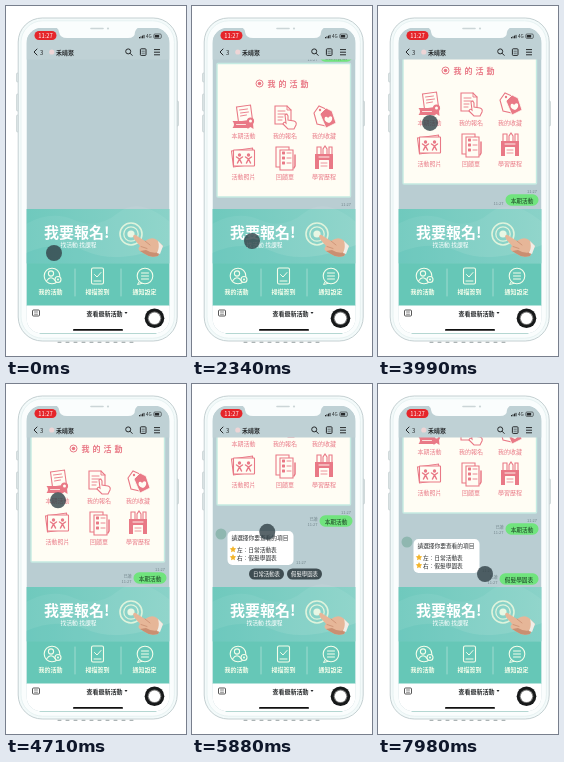
Write an HTML page that moves like this. It is 180 px wide and 350 px high and loops after 8 s.

```html
<!DOCTYPE html>
<html lang="zh-Hant">
<head>
<meta charset="utf-8">
<style>
  html, body { margin: 0; width: 100%; height: 100%; overflow: hidden; background: #fff; }
  svg { display: block; width: 100vw; height: 100vh; }
  text { font-family: "Noto Sans CJK TC", "Noto Sans CJK", "Noto Sans", sans-serif; }
</style>
</head>
<body>
<svg id="stage" viewBox="0 0 180 350"></svg>
<script>
const PINK = '#e97986', CREAM = '#fffdf4', BLACK = '#26292b', GREEN = '#70e47d', PALE = '#f4fdea', MUTED = '#73868c';
const stage = document.getElementById('stage');

const rect = (x, y, w, h, r, fill, more = '') =>
  `<rect x="${x}" y="${y}" width="${w}" height="${h}" rx="${r}" fill="${fill}" ${more}/>`;
const circle = (x, y, r, fill, more = '') =>
  `<circle cx="${x}" cy="${y}" r="${r}" fill="${fill}" ${more}/>`;
const path = (d, fill = 'none', more = '') => `<path d="${d}" fill="${fill}" ${more}/>`;
const stroke = (color, width = 1) => `stroke="${color}" stroke-width="${width}"`;
const line = (d, color, width = 1) =>
  path(d, 'none', `${stroke(color, width)} stroke-linecap="round" stroke-linejoin="round"`);
const text = (str, x, y, size, fill = BLACK, more = '') =>
  `<text x="${x}" y="${y}" font-size="${size}" fill="${fill}" dominant-baseline="central" ${more}>${str}</text>`;
const label = (str, x, y, size, fill, more = '') =>
  text(str, x, y, size, fill, `text-anchor="middle" ${more}`);
const group = (id, content) => `<g id="${id}">${content}</g>`;
const at = (x, y, content) => `<g transform="translate(${x} ${y})">${content}</g>`;
const BOLD = 'font-weight="700"', MEDIUM = 'font-weight="500"', END = 'text-anchor="end"';

// A sent message: green bubble, send time and a "read" mark.
function sent(id, str, y, width) {
  const x = 160.5 - width;
  return group(id,
    rect(x, y - 5.7, width, 11.4, 5.7, GREEN) +
    label(str, x + width / 2, y, 5.7, '#183d20', MEDIUM) +
    text('11:27', x - 2, y + 2.5, 4, MUTED, END) +
    group(id + 'Read', text('已讀', x - 2, y - 2.5, 4, MUTED, END)));
}

// Card icons, each drawn around its own centre.
const OUTLINE = stroke(PINK, 1.1);
const person = (x, y) => circle(x, y - 4, 1.7, PINK) + line(`M${x - 3} ${y - 2}L${x} ${y}L${x + 3} ${y - 2}M${x - 2} ${y + 4}L${x} ${y}L${x + 2} ${y + 4}`, PINK, 1.5);
const icons = {
  scroll: path('M-7 -10L7 -12L9 3L-5 5Z', CREAM, OUTLINE) + line('M-4 -7L4 -8M-3 -4L5 -5M-3 -1L3 -2', PINK, .9) +
    path('M-11 4H5V11H-11Q-8 7.5 -11 4Z', PINK) + line('M-7 7.5H2', CREAM, .8) +
    circle(7, 4, 3.6, PINK) + circle(7, 4, 1.5, CREAM) + path('M4.5 6L4 12L7 10L10 12L9.5 6Z', PINK),
  touch: path('M-10 -11H2L6 -7V7H-10Z', CREAM, OUTLINE) + line('M2 -11V-7H6M-7 -6H0M-7 -3H2M-7 0H-2M-7 3H-3', PINK, .9) +
    path('M0 -2Q2 -4 3 -1V3L9 4Q12 5 11 8L9 12H3L-2 7Q-1 4 1 6Z', CREAM, OUTLINE),
  save: path('M-10 -4L-5 -11L2 -8V9L-7 7Z', CREAM, OUTLINE) + circle(-4, -7, 1.2, PINK) +
    path('M-4 -3L2 -9L8 -6L12 6L2 11Z', PINK, stroke(CREAM, .8)) +
    path('M5 6Q-1 4 1 0Q3 -1 4 1Q6 -2 8 0Q9 4 5 6Z', CREAM),
  photos: path('M-12 -7L9 -10L11 6L-10 9Z', CREAM, OUTLINE) + rect(-10, -8, 21, 16, .5, CREAM, OUTLINE) +
    person(-4, 1) + person(5, 1),
  form: path('M-9 -11H4V9H-9Z', CREAM, OUTLINE) + path('M-5 -8H8V12H-5Z', CREAM, OUTLINE) +
    [-5, 0, 5].map(y => rect(-3, y - 1.5, 3, 3, .4, PINK) + line(`M2 ${y}H6`, PINK, .9)).join('') +
    line('M10 -3V8L9 10', PINK, 1.5),
  history: path('M-9 -4H9V11H-9Z', PINK) + rect(-5, 2, 10, 9, .5, CREAM) + line('M-3 5H3M-3 8H3', PINK, .8) +
    path('M-7 -4V-11H-3V-4M-1 -4V-9L1 -12L3 -9V-4M5 -4V-11H8V-4', CREAM, OUTLINE) + line('M-5 -1H5', CREAM, .9)
};
const cardItems = [
  ['scroll', '本期活動', 51.5, 111], ['touch', '我的報名', 93, 111], ['save', '我的收藏', 132, 111],
  ['photos', '活動照片', 51.5, 152], ['form', '回饋單', 93, 152], ['history', '學習歷程', 132, 152]
];

const card = group('card',
  rect(25, 57.5, 133.5, 133.5, 1, CREAM, stroke('#c5ebe2', 1.4)) +
  circle(67.5, 77.5, 3.5, 'none', stroke(PINK)) + circle(67.5, 77.5, 1.8, PINK) +
  [...'我的活動'].map((ch, i) => label(ch, 79.5 + i * 11, 77.5, 8, PINK, BOLD)).join('') +
  cardItems.map(([icon, name, x, y]) => at(x, y, icons[icon]) + label(name, x, y + 18.5, 6, PINK)).join('') +
  text('11:27', 159, 198, 4, MUTED, END));

const star = y => path(`M41 ${y - 3}l1 2.1 2.3.3-1.7 1.6.4 2.3-2-1.1-2 1.1.4-2.3-1.7-1.6 2.3-.3z`, '#f3b52c');
const reply = group('reply',
  circle(29, 220, 5.5, '#8fb7b0') +
  rect(35.5, 217, 66, 34, 5, '#fff') +
  text('請選擇你要查看的項目', 39.5, 223, 5.7) +
  star(235) + text('左：日常活動表', 45, 235, 5.7) +
  star(243) + text('右：假髮學園表', 45, 243, 5.7) +
  text('11:27', 104, 248, 4, MUTED));

const pill = (str, x, width) =>
  rect(x, 184.5, width, 11, 5.5, '#3f4d52') + label(str, x + width / 2, 190, 5.4, '#fff');

const chat = `<g clip-path="url(#chatArea)">` + group('feed',
    group('today', rect(84.5, 33, 14, 8, 4, '#9fb1b6') + label('今天', 91.5, 37, 4.4, '#eef4f5')) +
    sent('first', '我的活動', 50, 33) + card + sent('second', '本期活動', 207, 33) + reply +
    sent('third', '假髮學園表', 257, 39)) +
  group('choices', pill('日常活動表', 57, 35) + pill('假髮學園表', 95, 35)) + '</g>';

const header =
  rect(20.5, 22, 143, 31.5, 0, '#bfd1d5') +
  line('M31 43L28 46L31 49', BLACK) + text('3', 34, 46, 6, BLACK, MEDIUM) +
  circle(45.8, 46, 2.6, '#eed5d6') + text('禾晴聚', 50, 46, 6, BLACK, BOLD) +
  circle(122.2, 45.4, 2.5, 'none', stroke(BLACK)) + line('M124.2 47.4L126.2 49.4', BLACK) +
  rect(134.4, 42.8, 5.6, 6.6, .8, 'none', stroke(BLACK)) + line('M136 45.2H138.4M136 47.2H138.4', BLACK, .6) +
  line('M148.4 43.6H153.6M148.4 46.2H153.6M148.4 48.8H153.6', BLACK) +
  rect(28.5, 25, 22, 9, 4.5, '#e5262b') +
  group('clock', label('11:27', 39.5, 29.5, 5.8, '#fff', MEDIUM)) +
  group('recording', circle(39.5, 29.5, 2.7, 'none', stroke('#fff', .8)) + circle(39.5, 29.5, 1.3, '#fff')) +
  [0, 1, 2, 3].map(i => rect(133 + i * 1.5, 31 - i * .7, 1, 1.3 + i * .7, 0, BLACK)).join('') +
  text('4G', 140, 30.3, 4.6, BLACK, MEDIUM) +
  rect(147.8, 28, 7.5, 4.4, 1.2, 'none', stroke(BLACK, .6)) + rect(148.8, 29, 4.4, 2.4, .5, BLACK);

const ICON_LINE = stroke(PALE, 1.1), LOWER = '#66c7b7';
const menu =
  rect(20.5, 203, 143, 97, 0, LOWER) +
  rect(20.5, 203, 143, 54.5, 0, 'url(#banner)') +
  path('M20 218Q45 204 68 214T112 207T164 216V257H20Z', '#fff', 'opacity=".06"') +
  path('M20 247Q52 233 82 246T164 239V257H20Z', '#49b8ad', 'opacity=".2"') +
  text('我要報名!', 38, 225.5, 15, '#fff', BOLD) +
  text('找活動 找課程', 54.5, 238, 5.8, '#fff', MEDIUM) +
  circle(125, 228, 11, 'none', stroke('#dff3dc', 1.6)) +
  circle(125, 228, 7.2, 'none', stroke('#dff3dc', 1.3)) + circle(125, 228, 3.6, '#e8f7e4') +
  path('M127 230Q129 227.5 131 230L139 235Q146 230 151 234L157 240L152 250Q144 252 139 248L134 245Q131 243 134 240L128 233Z', '#e6b698') +
  path('M134 245L139 248Q144 252 152 250L154 246Q146 248 140 244Z', '#c98f72') +
  line('M139 235L144 239M135 240.5L141 242.5', '#c98f72', .8) +
  path('M152 235L157 240L154 248L151 247Q154 241 152 235Z', '#f1ede7') +
  line('M69 263V290M115 263V290', '#b9e5dc', .7) +
  circle(46, 270, 7.8, 'none', ICON_LINE) + circle(45, 267.5, 2.6, 'none', ICON_LINE) +
  path('M40.5 275Q45 268.5 49.5 275', 'none', ICON_LINE) + circle(52, 273.5, 3, LOWER, ICON_LINE) + circle(52, 273.5, 1, PALE) +
  rect(85.5, 262, 12, 16, 1.5, 'none', ICON_LINE) + line('M88.5 268.5L91 271L95 266.5M88 275H95', PALE) +
  circle(139, 270, 7.8, 'none', ICON_LINE) + line('M135.5 267H142.5M135.5 270H142.5M135.5 273H142.5M133 276L131.5 278.5L136 277.4', PALE) +
  ['我的活動', '掃描簽到', '通知設定'].map((s, i) => label(s, 44.5 + i * 47, 285.5, 6, PALE, BOLD)).join('');

const footer =
  rect(20.5, 299.5, 143, 28, 0, '#fff') +
  rect(26.5, 304, 7, 6, 1, 'none', stroke('#444', .9)) + line('M28.5 306H31.5M28.5 308.2H31.5', '#444', .7) +
  text('查看最新活動', 80.5, 307, 6, BLACK, BOLD) + path('M118.5 306h3l-1.5 2z', BLACK) +
  rect(67, 323, 50, 1.8, .9, '#111');

const button = (x, y, h) => rect(x, y, 2, h, 1, '#e4eced', stroke('#bcc8ca', .6));
const phone =
  button(10.5, 67, 9) + button(10.5, 88, 17) + button(10.5, 109, 17) + button(170.5, 95, 25) +
  rect(12.2, 12, 159, 323, 24, '#f3fafa', stroke('#bfcbcd', .9)) +
  rect(15, 14.8, 153.4, 317.4, 21.5, '#fafdfd', stroke('#e3efef', .8)) +
  line('M52 336.3H132', '#8d9799', .9).replace('/>', ' stroke-dasharray="3 5"/>');

stage.innerHTML = `
  <defs>
    <clipPath id="screen">${rect(20.5, 22, 143, 305.5, 15, '#fff')}</clipPath>
    <clipPath id="chatArea">${rect(20.5, 53, 143, 150, 0, '#fff')}</clipPath>
    <linearGradient id="banner"><stop stop-color="#6fc9bd"/><stop offset="1" stop-color="#8ad2c8"/></linearGradient>
  </defs>` +
  phone +
  `<g clip-path="url(#screen)">` + rect(20.5, 22, 143, 306, 0, '#b9cdd2') + chat + header + menu + footer +
  path('M48 21Q53 22 53 26Q54 32 61 32H122Q129 32 129 26Q130 22 134 21Z', '#fafdfd') + '</g>' +
  line('M34 327.5H150', '#a3cfc8', .7) +
  line('M85 22.5H97', '#cbd5d7', 1.6) + circle(102, 22.5, 1.1, '#cbd5d7') +
  circle(148.5, 312.3, 9.8, '#17191a') + circle(148.5, 312.3, 6.8, '#777') + circle(148.5, 312.3, 5.8, '#fff') +
  group('touch', circle(0, 0, 8, '#34444a', 'opacity=".82"'));

// Keys are [time, value...]; values ease between neighbours.
const scrollKeys = [[0, 22], [1950, 22], [2250, 0], [3680, 0], [3900, -13], [5350, -13], [5630, -70], [7150, -70], [7400, -62]];
const touchKeys = [[0, 48, 247], [600, 48, 270], [1750, 48, 270], [2350, 60, 235], [3200, 60, 235],
  [3600, 52, 117], [5450, 52, 116], [6400, 106, 190], [8000, 107, 190]];

function sample(keys, t) {
  const next = keys.findIndex(k => k[0] > t);
  if (next < 0) return keys[keys.length - 1].slice(1);
  const a = keys[next - 1], b = keys[next];
  const u = (t - a[0]) / (b[0] - a[0]), eased = u * u * (3 - 2 * u);
  return a.slice(1).map((v, i) => v + (b[i + 1] - v) * eased);
}

// Each part is visible from its start to its end, with a short fade in.
const spans = {
  today: [800, 8000], first: [800, 8000], firstRead: [1150, 8000], card: [1950, 8000],
  second: [3680, 8000], secondRead: [4400, 8000], reply: [5330, 8000],
  choices: [5600, 7130], third: [7130, 8000], thirdRead: [7700, 8000]
};
const part = id => document.getElementById(id);

function draw(elapsed) {
  const t = elapsed % 8000;
  part('feed').setAttribute('transform', `translate(0 ${sample(scrollKeys, t)[0]})`);
  part('touch').setAttribute('transform', `translate(${sample(touchKeys, t)})`);
  for (const [id, [start, end]] of Object.entries(spans))
    part(id).setAttribute('opacity', t < end ? Math.max(0, Math.min(1, (t - start) / 100)) : 0);
  const blinking = t >= 1000 && t < 1900;
  part('clock').setAttribute('opacity', blinking ? 0 : 1);
  part('recording').setAttribute('opacity', blinking ? 1 : 0);
  requestAnimationFrame(() => draw(performance.now() - origin));
}
const origin = performance.now();
draw(0);
</script>
</body>
</html>
```
